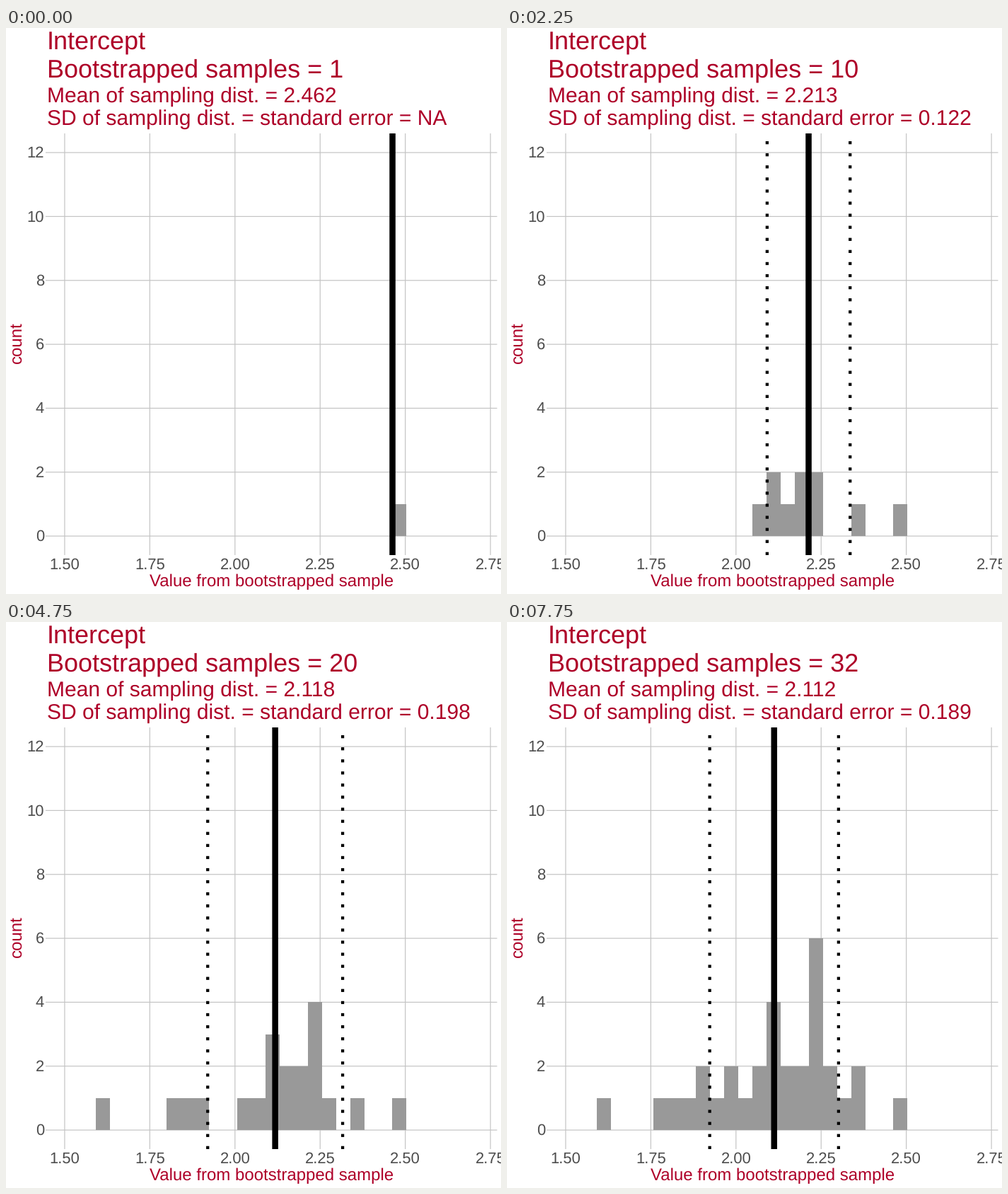
Recreate the animation shown at these times as a matplotlib script. Size 700 px wide and 800 px high, loop 8000 ms.

```python
import numpy as np
import matplotlib.pyplot as plt
from matplotlib.animation import FuncAnimation
from matplotlib.patches import Rectangle

W, H, DPI = 700, 800, 100
PT = 72 / DPI
RED, GRID, BAR, LABEL = "#ae0028", "#c4c4c4", "#999999", "#4d4d4d"
LEFT, RIGHT, TOP, BOTTOM = 56, 694.5, 149, 745
BIN0, BIN_W, BINS = 1.5924, 0.04142, 22

# bootstrapped intercepts in the order they are drawn
SAMPLES = np.array([
    2.4624, 2.245, 2.155, 2.200, 2.108, 2.062, 2.245, 2.356,
    2.191, 2.108, 2.274, 2.230, 1.899, 2.118, 1.824, 2.035,
    1.868, 2.235, 1.602, 2.143, 2.066, 2.342, 1.988, 2.220,
    1.950, 2.108, 1.990, 2.245, 1.787, 2.288, 2.326, 1.914,
])

plt.rcParams["font.family"] = "Liberation Sans"
plt.rcParams["text.hinting"] = "none"

fig = plt.figure(figsize=(W / DPI, H / DPI), dpi=DPI, facecolor="white")
ax = fig.add_axes([0, 0, 1, 1])
ax.set_xlim(0, W)
ax.set_ylim(H, 0)
ax.axis("off")


def px(value):
    return 82.95 + (value - 1.5) * 481.7


def py(count):
    return 718.1 - count * 45.17


def line(xs, ys, width, color="black", **kw):
    return ax.plot(xs, ys, color=color, lw=width * PT, snap=False,
                   solid_capstyle="butt", dash_capstyle="butt", **kw)[0]


def label(x, y, text, size, color=RED, **kw):
    return ax.text(x, y, text, fontsize=size * PT, color=color,
                   ha="left", va="baseline", **kw)


def vline(width, **kw):
    return line([0, 0], [BOTTOM, TOP], width, zorder=4, **kw)


def fmt(value):
    return f"{round(value, 3):g}"


# grid and tick labels
for count in range(0, 13, 2):
    y = py(count)
    line([LEFT, RIGHT], [y, y], 1.2, GRID, zorder=1)
    text = str(count)
    label(54 - 12.2 * len(text), y + 7, text, 22, LABEL)
for value in np.arange(1.5, 2.76, 0.25):
    x = px(value)
    line([x, x], [TOP, BOTTOM], 1.2, GRID, zorder=1)
    label(x - 21.4, 765, f"{value:.2f}", 22, LABEL)

label(203, 789, "Value from bootstrapped sample", 24)
label(22, 474.5, "count", 24, rotation=90, rotation_mode="anchor")

# headings
label(58, 31, "Intercept", 36)
size_text = label(58, 70, "", 36)
mean_text = label(58, 105, "", 30)
sd_text = label(58, 137, "", 30)

edges = BIN0 + BIN_W * np.arange(BINS + 1)
bars = []
for a, b in zip(edges[:-1], edges[1:]):
    bar = Rectangle((px(a), py(0)), px(b) - px(a), 0, fc=BAR, lw=0,
                    antialiased=False, zorder=3)
    bars.append(ax.add_patch(bar))

mean_line = vline(8.53)
sd_lines = [vline(4.27, linestyle=(0, (1, 3))) for _ in range(2)]


def update(frame):
    n = frame + 1
    drawn = SAMPLES[:n]
    mean = drawn.mean()
    sd = drawn.std(ddof=1) if n > 1 else None

    counts, _ = np.histogram(drawn, edges)
    for bar, count in zip(bars, counts):
        bar.set_height(py(count) - py(0))
        bar.set_visible(count > 0)

    mean_line.set_xdata([px(mean)] * 2)
    for sign, dotted in zip((-1, 1), sd_lines):
        dotted.set_visible(sd is not None)
        if sd is not None:
            dotted.set_xdata([px(mean + sign * sd)] * 2)

    size_text.set_text(f"Bootstrapped samples = {n}")
    mean_text.set_text(f"Mean of sampling dist. = {fmt(mean)}")
    error = "NA" if sd is None else fmt(sd)
    sd_text.set_text(f"SD of sampling dist. = standard error = {error}")
    return [*bars, mean_line, *sd_lines, size_text, mean_text, sd_text]


anim = FuncAnimation(fig, update, frames=len(SAMPLES), interval=250,
                     repeat=True, repeat_delay=0, blit=False)
plt.show()
```
